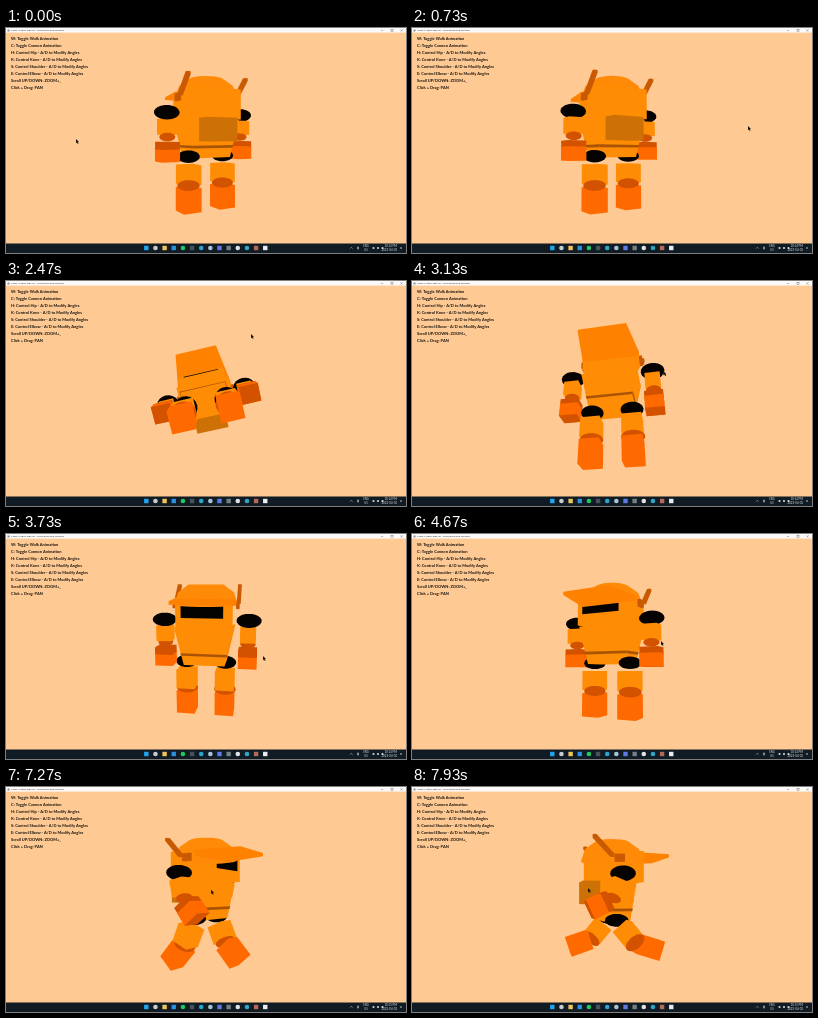
An HTML page with a canvas that plays this animation: 400x225 px, repeating every 8000 ms.

```html
<!DOCTYPE html>
<html lang="en">
<head>
<meta charset="utf-8">
<title>Robot viewer</title>
<style>
html, body { margin: 0; width: 100%; height: 100%; overflow: hidden; background: #ffc993; }
canvas { display: block; width: 100vw; height: 100vh; }
</style>
</head>
<body>
<canvas id="stage"></canvas>
<script>
const W = 400, H = 225, LOOP = 8000, CAMERA = 300;
const canvas = document.getElementById('stage');
const ctx = canvas.getContext('2d');
const RAD = Math.PI / 180;

const ORANGE = '#ff8c05', CAP = '#ff8a08', BRIM = '#ff8100', SHIN = '#ff6a00',
      DARK = '#d25200', HORN = '#c95a02', PACK = '#cd7006', BELT = '#a95405', BLACK = '#050301';

// time, yaw, pitch (positive looks up from below), centre y, pointer x, pointer y
const KEYS = [
  [0, -150, 0, 109, 70, 111],
  [730, -149, 3, 109, 336, 98],
  [2470, -13, 81, 119, 245, 53],
  [3730, -9, -11, 109, 257, 122],
  [4670, -27, 5, 110, 249, 107],
  [6530, 0, 0, 110, 239, 105],
  [7930, 103, 0, 113, 176, 101]
];

const ease = u => u * u * (3 - 2 * u);
const clamp = u => Math.max(0, Math.min(1, u));

function poseAt(t) {
  let i = 0;
  while (i < KEYS.length - 2 && t >= KEYS[i + 1][0]) i++;
  const a = KEYS[i], b = KEYS[i + 1];
  const u = ease(clamp((t - a[0]) / (b[0] - a[0])));
  const [, yaw, pitch, cy, mx, my] = a.map((v, k) => v + (b[k] - v) * u);
  return { yaw: yaw * RAD, pitch: pitch * RAD, cy, mx, my };
}

// Model shapes: point clouds whose projected hull is the silhouette
function box(x, y, z, hx, hy, hz) {
  const pts = [];
  for (const i of [-1, 1]) for (const j of [-1, 1]) for (const k of [-1, 1])
    pts.push([x + i * hx, y + j * hy, z + k * hz]);
  return pts;
}

function ring(y, rx, rz, x = 0, z = 0) {
  return Array.from({ length: 20 }, (_, i) => {
    const a = i * Math.PI / 10;
    return [x + rx * Math.cos(a), y, z + rz * Math.sin(a)];
  });
}

function ball(x, y, z, rx, ry, rz) {
  const pts = [];
  for (let i = -6; i <= 6; i++) {
    const a = i * 15 * RAD;
    pts.push(...ring(y + ry * Math.sin(a), rx * Math.cos(a), rz * Math.cos(a), x, z));
  }
  return pts;
}

const slab = (y, hx, hz, x = 0) =>
  [[x - hx, y, hz], [x + hx, y, hz], [x + hx, y, -hz], [x - hx, y, -hz]];

// Swing points about a sideways axis at the given height
function swing(pts, pivot, angle) {
  const c = Math.cos(angle), s = Math.sin(angle);
  return pts.map(([x, y, z]) => [x, pivot + (y - pivot) * c + z * s, z * c - (y - pivot) * s]);
}

function beltPatches() {
  const top = slab(-8, 22.8, 14.8), low = slab(-10.6, 22, 14.4);
  return top.map((p, i) => {
    const j = (i + 1) % 4;
    return { color: BELT, pts: [p, top[j], low[j], low[i]] };
  });
}

const visor = { color: BLACK, pts: [[-19.4, 40, 25], [19.4, 40, 25], [19.4, 27.5, 25], [-19.4, 27.5, 25]] };

const bodyParts = [
  { color: ORANGE, pts: [...slab(17, 28, 17), ...slab(-20, 20, 13)], patches: beltPatches() },
  { color: PACK, pts: box(0, 7, -23, 16, 11, 8) },
  { color: ORANGE, pts: [...slab(46, 24.5, 25), ...slab(17, 24.5, 25)], patches: [visor] },
  { color: CAP, pts: [...ring(38, 31, 31), ...ring(50, 27, 27), ...ring(57.5, 17, 17)] },
  { color: BRIM, pts: [[-23, 44, 51], [23, 44, 51], [-23, 41, 51], [23, 41, 51],
                       [-30, 44, 8], [30, 44, 8], [-30, 39, 8], [30, 39, 8]] }
];
for (const s of [-1, 1]) {
  bodyParts.push(
    { color: HORN, pts: box(s * 31, 38, 0, 1.5, 3.5, 4.5) },
    { color: HORN, pts: [...box(s * 31.5, 40, -7, 1.8, 1.3, 1.5), ...box(s * 31.5, 56.5, -23, 1.8, 1.3, 1.5)] }
  );
}

function limbs(walk) {
  const parts = [];
  for (const s of [-1, 1]) {
    const hx = s * 19.5, ax = s * 41.5;
    const leg = -s * walk, arm = s * walk;
    const onThigh = pts => swing(pts, -19, leg * 40 * RAD);
    const onShin = pts => onThigh(swing(pts, -47, leg * 32 * RAD));
    const onArm = pts => swing(pts, 23, arm * 22 * RAD);
    const onHand = pts => onArm(swing(pts, 0, arm * 43 * RAD));
    const palm = { color: DARK, pts: onHand(slab(-23, 9, 8.5, ax)) };

    parts.push(
      { color: BLACK, pts: ball(hx, -19, 0, 11, 6, 11), bias: -3 },
      { color: ORANGE, pts: onThigh(box(hx, -36.5, 0, 9.3, 9.5, 9)) },
      { color: SHIN, pts: onShin(box(hx, -60.5, 0, 9.3, 11.5, 9.3)) },
      { color: DARK, pts: onThigh(ball(hx, -47, 0, 11, 5, 10.5)), bias: 2 },
      { color: BLACK, pts: ball(s * 42, 23, 0, 12, 6.7, 11) },
      { color: ORANGE, pts: onArm(box(ax, 9.5, 0, 7.5, 7.5, 7)) },
      { color: SHIN, pts: onHand(box(ax, -16.5, 0, 9, 6.5, 8.5)), patches: [palm] },
      { color: DARK, pts: onHand(box(ax, -8, 0, 9, 3.5, 8.2)) },
      { color: DARK, pts: onArm(ball(ax, 0, 0, 7.5, 4, 7)), bias: 1 }
    );
  }
  return parts;
}

function projector({ yaw, pitch, cy }) {
  const c = Math.cos(yaw), s = Math.sin(yaw), cp = Math.cos(pitch), sp = Math.sin(pitch);
  return ([x, y, z]) => {
    const z1 = z * c - x * s;
    const depth = z1 * cp - y * sp;
    const k = CAMERA / (CAMERA - depth);
    return [200 + (x * c + z * s) * k, cy - (y * cp + z1 * sp) * k, depth];
  };
}

const cross = (o, a, b) => (a[0] - o[0]) * (b[1] - o[1]) - (a[1] - o[1]) * (b[0] - o[0]);

function hull(pts) {
  const sorted = [...pts].sort((a, b) => a[0] - b[0] || a[1] - b[1]);
  const half = list => {
    const out = [];
    for (const p of list) {
      while (out.length > 1 && cross(out[out.length - 2], out[out.length - 1], p) <= 0) out.pop();
      out.push(p);
    }
    out.pop();
    return out;
  };
  return [...half(sorted), ...half(sorted.reverse())];
}

function fillPoly(pts, color) {
  ctx.fillStyle = color;
  ctx.beginPath();
  for (const [x, y] of pts) ctx.lineTo(x, y);
  ctx.fill();
}

function drawRobot(pose, walk) {
  const project = projector(pose);
  const items = [...bodyParts, ...limbs(walk)].map(part => {
    const pts = part.pts.map(project);
    const depth = pts.reduce((sum, p) => sum + p[2], 0) / pts.length + (part.bias || 0);
    return { part, pts, depth };
  });
  items.sort((a, b) => a.depth - b.depth);
  for (const { part, pts } of items) {
    fillPoly(hull(pts), part.color);
    for (const patch of part.patches || []) {
      const q = patch.pts.map(project);
      if (cross(q[0], q[1], q[2]) > 0) fillPoly(q, patch.color);
    }
  }
}

function label(text, x, y, size, color, align = 'left', weight = 400) {
  ctx.font = `${weight} ${size}px Lato, sans-serif`;
  ctx.fillStyle = color;
  ctx.textAlign = align;
  ctx.textBaseline = 'middle';
  ctx.fillText(text, x, y);
}

function dot(x, y, r, color) {
  ctx.fillStyle = color;
  ctx.beginPath();
  ctx.arc(x, y, r, 0, 7);
  ctx.fill();
}

function rect(x, y, w, h, color) {
  ctx.fillStyle = color;
  ctx.fillRect(x, y, w, h);
}

const HELP = [
  'W: Toggle Walk Animation',
  'C: Toggle Cannon Animation',
  'H: Control Hip - A/D to Modify Angles',
  'K: Control Knee - A/D to Modify Angles',
  'S: Control Shoulder - A/D to Modify Angles',
  'E: Control Elbow - A/D to Modify Angles',
  'Scroll UP/DOWN: ZOOM+_',
  'Click + Drag: PAN'
];

const ICONS = ['#22a5ee', '#c4ccd0', '#efc45c', '#2b91df', '#1fcb62', '#46525a', '#2aa5d2',
               '#a9c3d8', '#5c79e4', '#718087', '#dfe3e5', '#2ba7c7', '#b46a58', '#e9ecee'];
const ROUND = [1, 4, 6, 7, 10, 11];

function drawWindow(t) {
  rect(0, 0, W, 4.6, '#fbfaf8');
  rect(1.5, 1.5, 2, 2, '#8b9297');
  label('MECH VIEW-DEMO - Local Build and Preview', 5, 2.6, 2.6, '#333');
  ctx.strokeStyle = '#555';
  ctx.lineWidth = 0.4;
  ctx.strokeRect(385, 1.4, 2, 2);
  ctx.beginPath();
  ctx.moveTo(375, 2.5); ctx.lineTo(377.2, 2.5);
  ctx.moveTo(394.5, 1.4); ctx.lineTo(396.6, 3.5);
  ctx.moveTo(396.6, 1.4); ctx.lineTo(394.5, 3.5);
  ctx.stroke();
  HELP.forEach((line, i) => label(line, 5, 10.4 + i * 7, 4, '#15100b', 'left', 700));

  rect(0, 215.5, W, 9.5, '#101b23');
  ICONS.forEach((color, i) => {
    const x = 140.3 + i * 9.15;
    if (ROUND.includes(i)) dot(x, 220, 2.3, color);
    else rect(x - 2.2, 217.8, 4.4, 4.4, color);
  });
  ctx.strokeStyle = '#d5dadd';
  ctx.lineWidth = 0.5;
  ctx.beginPath();
  ctx.moveTo(344, 220.6); ctx.lineTo(345.3, 219.3); ctx.lineTo(346.6, 220.6);
  ctx.stroke();
  rect(351.3, 218.7, 1.4, 2.6, '#b8c0c4');
  label('ENG', 360, 218.2, 2.7, '#d5dadd', 'center');
  label('US', 360, 222, 2.7, '#d5dadd', 'center');
  for (const x of [367.5, 372, 376.5]) dot(x, 220, 1.1, '#cfd5d8');
  label(t < 5200 ? '10:14 PM' : '10:15 PM', 391, 218.2, 2.9, '#dfe3e5', 'right');
  label('2023-04-03', 391, 222, 2.9, '#dfe3e5', 'right');
  dot(395, 220, 0.8, '#cfd5d8');
}

function drawPointer(x, y) {
  fillPoly([[x, y], [x, y + 4.2], [x + 1, y + 3.4], [x + 1.9, y + 5], [x + 2.6, y + 4.6],
            [x + 1.8, y + 3.1], [x + 3, y + 3]], '#17120e');
}

function draw(t) {
  ctx.setTransform(canvas.width / W, 0, 0, canvas.height / H, 0, 0);
  rect(0, 0, W, H, '#ffc993');
  const pose = poseAt(t);
  const walk = ease(clamp((t - 7000) / 400)) * Math.cos((t - 7930) / 1100 * 2 * Math.PI);
  drawRobot(pose, walk);
  drawWindow(t);
  drawPointer(pose.mx, pose.my);
}

function resize() {
  const ratio = window.devicePixelRatio || 1;
  canvas.width = Math.round(innerWidth * ratio);
  canvas.height = Math.round(innerHeight * ratio);
}

const STEP = 1000 / 15;
function frame() {
  const t = performance.now() % LOOP;
  draw(Math.floor((t + 5) / STEP) * STEP);
  requestAnimationFrame(frame);
}

addEventListener('resize', resize);
resize();
frame();
</script>
</body>
</html>
```
